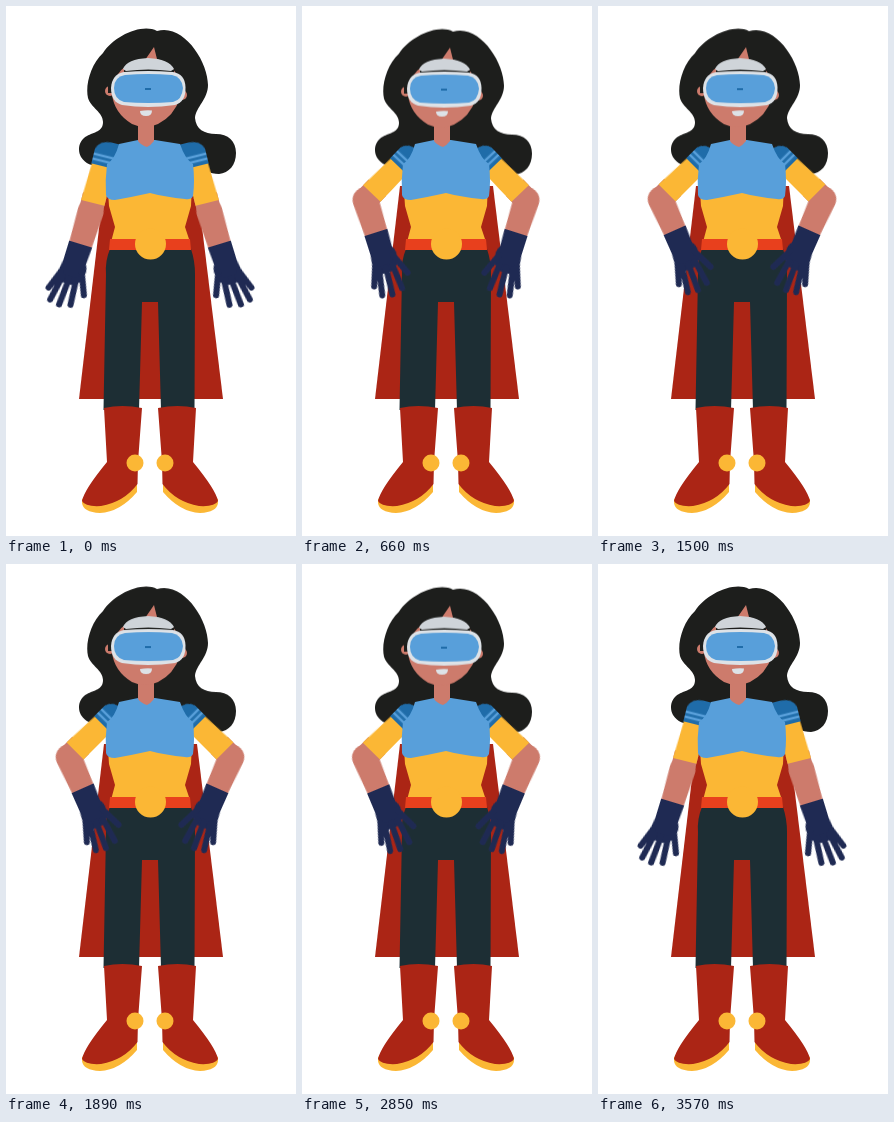
Write an HTML page without scripts that moves like this. It is 290 px wide and 530 px high and loops after 3600 ms.

```html
<!DOCTYPE html>
<html lang="en">
<head>
<meta charset="utf-8">
<title>Hero with headset</title>
<style>
  html, body { margin: 0; width: 100%; height: 100%; overflow: hidden; background: #fff; }
  svg { display: block; width: 290px; height: 530px; }

  .hair { fill: #1d1e1c; }
  .skin { fill: #cd7b6c; }
  .yellow { fill: #fbb735; }
  .red { fill: #ab2515; }
  .belt { fill: #e8401d; }
  .pants { fill: #1d2e34; }
  .blue { fill: #589fda; }
  .pad { fill: #1f6ca9; }
  .navy { fill: #1f2a53; }
  .pale { fill: #dde2e7; }
  .cap { fill: #cfd4d9; }
  .line { fill: none; stroke-linecap: round; stroke-linejoin: round; }
  .fingers { stroke: #1f2a53; stroke-width: 6; }
  .stripes { stroke: #589fda; stroke-width: 2.6; stroke-linecap: butt; }

  .upper { animation: upper 3.6s infinite; }
  .lower { animation: lower 3.6s infinite; }
  .head { animation: bob 1.8s ease-in-out infinite; }

  @keyframes upper {
    0% { transform: rotate(14deg); animation-timing-function: cubic-bezier(.35, .1, .65, .8); }
    10% { transform: rotate(38deg); animation-timing-function: cubic-bezier(.2, .6, .5, 1); }
    28%, 75% { transform: rotate(45deg); animation-timing-function: cubic-bezier(.5, 0, .8, .5); }
    88.333% { transform: rotate(38deg); animation-timing-function: cubic-bezier(.3, .25, .5, 1); }
    100% { transform: rotate(14deg); }
  }
  @keyframes lower {
    0% { transform: rotate(3deg); animation-timing-function: cubic-bezier(.35, .1, .65, .8); }
    10% { transform: rotate(-44deg); animation-timing-function: cubic-bezier(.3, .5, .6, 1); }
    28%, 75% { transform: rotate(-69deg); animation-timing-function: cubic-bezier(.5, 0, .8, .5); }
    88.333% { transform: rotate(-45deg); animation-timing-function: cubic-bezier(.3, .25, .5, 1); }
    100% { transform: rotate(3deg); }
  }
  @keyframes bob {
    50% { transform: translateY(.7px); }
  }
</style>
</head>
<body>
<svg viewBox="0 0 290 530">
  <defs>
    <!-- Limbs hang straight down from their joint at the origin -->
    <path id="elbow" class="skin" d="M-12 30H12V48H-12Z"/>
    <g id="forearm">
      <path class="skin" d="M-13 0A13 13 0 0 1 13 0L11.5 37H-11.5Z"/>
      <path class="navy" d="M-12 34H12L11 52Q15 58 12 66Q10 76 0 76Q-13 77 -14 68L-12 54Z"/>
      <path class="line fingers" d="M-11 66L-18 85M-8 70L-13 96M-1 70L-3 98M6 70L8 95M9 60L18 82"/>
    </g>
    <g id="sleeve">
      <path class="yellow" d="M-10 -12Q0 -20 12 -12V38H-12Z"/>
      <path class="pad" d="M-11 0V-15Q-8 -25 4 -25H14V0Z"/>
      <path class="line stripes" d="M-11 -10H14M-11 -5H14"/>
    </g>
    <g id="boot">
      <path class="yellow" d="M76 493L131 477V486Q114 506 94 507Q77 506 76 497Z"/>
      <path class="red" d="M98 402Q116 398 136 402L132 456L131.500 478Q118 496 95 500Q79 501 76 495Q78 484 101 456Z"/>
      <circle class="yellow" cx="129" cy="457" r="8.500"/>
    </g>
  </defs>

  <path class="hair head" d="M151 25C136 17 108 30 97 47C85 58 79 79 82 92C85 102 97 106 97 116C97 126 88 126 81 130C73 134 71 144 75 151C80 159 89 161 99 160L190 155C196 164 204 168 213 168C223 167 230 159 230 147C230 135 222 128 210 128C198 128 190 123 189 112C190 101 202 93 202 79C202 55 177 17 151 25Z"/>
  <path class="red" d="M98 180H191L217 393H73Z"/>

  <path class="yellow" d="M100 155H187L185 200L179 221L184 236H105L109 221L103 200Z"/>
  <path class="pants" d="M104 243H185Q189 255 189 268L188.500 404H155L152 296H136L133 404H97.500L100 268Q99 255 104 243Z"/>
  <use href="#boot"/>
  <use href="#boot" transform="translate(288 0) scale(-1 1)"/>
  <path class="belt" d="M104 233H184L185 244H103Z"/>
  <circle class="yellow" cx="144.500" cy="238" r="15.500"/>

  <g transform="translate(96 160)">
    <g class="upper">
      <use href="#elbow"/>
      <g transform="translate(0 47)"><g class="lower"><use href="#forearm"/></g></g>
      <use href="#sleeve"/>
    </g>
  </g>
  <g transform="translate(192 160) scale(-1 1)">
    <g class="upper">
      <use href="#elbow"/>
      <g transform="translate(0 47)"><g class="lower"><use href="#forearm"/></g></g>
      <use href="#sleeve"/>
    </g>
  </g>

  <path class="blue" d="M113 138L132 134H149L174 138Q179 153 187 158Q189 175 187 190Q185 194 179 193Q160 191 144 187Q126 191 109 194Q101 194 100 189Q99 174 101 158Q109 153 113 138Z"/>
  <path class="skin" d="M132 112H148V135Q145 139 141 141Q135 139 132 135Z"/>

  <g class="head">
    <circle class="skin" cx="104" cy="85" r="5"/>
    <circle class="skin" cx="176" cy="89" r="5"/>
    <path class="skin" d="M148 41L139 54Q108 57 106 88Q108 107 126 118Q139 124 152 118Q168 110 174 92Q176 60 151 53Z"/>
    <path class="hair" d="M102 80H108V87H102ZM118 64Q142 54 168 64V70H118Z"/>
    <path class="cap" d="M117 63Q121 53 142 52Q163 53 168 63L165 65Q142 62 120 65Z"/>
    <path class="pale" d="M118 66Q142 64 167 66Q179 68 179.500 81Q180 96 169 99Q142 103 116 99Q105 96 105 82Q106 68 118 66Z"/>
    <path class="blue" d="M119 69Q142 67 166 69Q176 71 177 82Q176 94 167 96Q142 98 118 96Q108 93 108 82Q108 71 119 69Z"/>
    <path class="pad" d="M139 82H145V84H139Z"/>
    <path class="pale" d="M134 105Q140 104 146 104.500Q146 110 140 110Q134 110 134 105Z"/>
  </g>
</svg>
</body>
</html>
```
